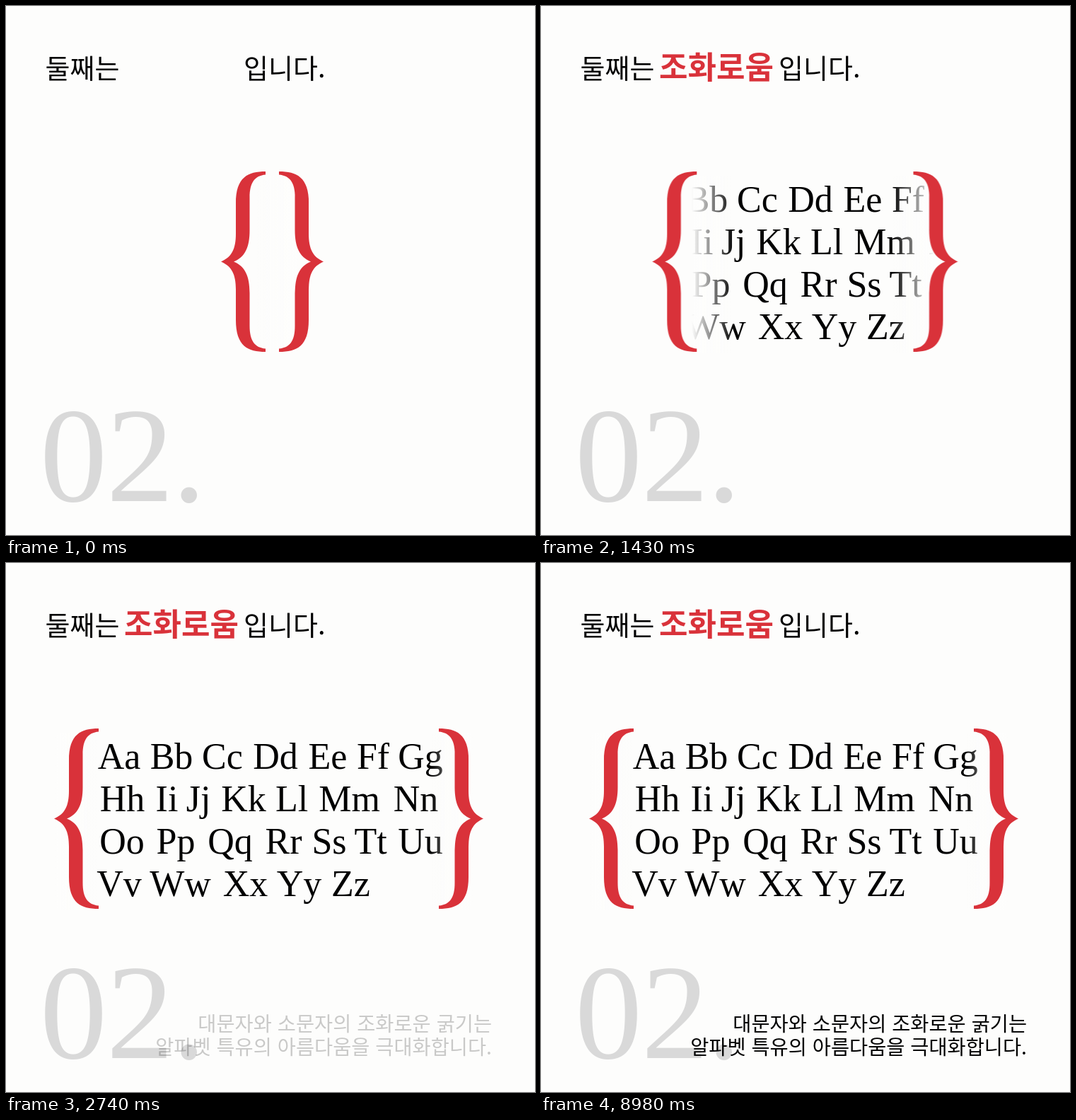
Write an HTML page that moves like this. It is 748 px wide and 748 px high and loops after 9.07 s.

```html
<!DOCTYPE html>
<html lang="ko">
<head>
<meta charset="utf-8">
<title>조화로움</title>
<style>
  html, body { margin: 0; width: 100%; height: 100%; overflow: hidden; background: #fdfdfc; }
  svg { display: block; width: 100%; height: 100%; }
  text { font-family: "Noto Sans CJK KR", "Noto Sans KR", "Noto Sans CJK", sans-serif; }
  .head { font-size: 38px; }
  .word { font-size: 44px; font-weight: 700; fill: #d9323a; }
  .caption { font-size: 28.4px; text-anchor: end; }
  .number { font: 190px "Liberation Serif", "Times New Roman", serif; fill: #d9d9d9; }
  .letters text { font: 52px "Liberation Serif", "Times New Roman", serif; text-anchor: middle; }
  .brace { fill: #d9323a; }

  .word, .caption, .letters, .cover, .brace { animation: 9.07s linear infinite both; }
  .word { animation-name: word; }
  .caption { animation-name: caption; }
  .letters { animation-name: letters; }
  .cover.left { animation-name: cover-left; }
  .cover.right { animation-name: cover-right; }
  .brace.left { animation-name: brace-left; }
  .brace.right { animation-name: brace-right; }

  @keyframes word {
    0%, .33% { opacity: 0; }
    6.95%, 100% { opacity: 1; }
  }
  @keyframes caption {
    0%, 30.19% { opacity: 0; }
    30.2% { opacity: .2; }
    34.95%, 100% { opacity: 1; }
  }
  @keyframes letters {
    0%, 7.82% { opacity: 0; }
    9.7%, 100% { opacity: 1; }
  }
  @keyframes cover-left {
    0%, 7.82% { transform: translateX(365px); }
    18.74% { transform: translateX(157px); }
    21.61%, 100% { transform: translateX(70px); }
  }
  @keyframes cover-right {
    0%, 7.82% { transform: translateX(413px); }
    18.74% { transform: translateX(609px); }
    21.61%, 100% { transform: translateX(660px); }
  }
  @keyframes brace-left {
    0%, 7.82% { transform: translateX(236px); }
    20.62%, 100% { transform: translateX(0); }
  }
  @keyframes brace-right {
    0%, 7.82% { transform: translateX(-226px); }
    20.62%, 100% { transform: translateX(0); }
  }
</style>
</head>
<body>
<svg viewBox="0 0 748 748">
  <defs>
    <linearGradient id="fade">
      <stop offset=".9" stop-color="#fdfdfc"/>
      <stop offset="1" stop-color="#fdfdfc" stop-opacity="0"/>
    </linearGradient>
    <!-- opaque up to x = 0, clear from x = 60 -->
    <rect id="cover" x="-540" y="240" width="600" height="250" fill="url(#fade)"/>
    <path id="brace" d="M63 0C38 0 21 8 21 45V88C21 110 15 121 0 127.5C15 134 21 145 21 167V210C21 247 38 255 63 255V250.5C48 249 40.5 240 40.5 218V172C40.5 148 34 134 18 127.5C34 121 40.5 107 40.5 83V37C40.5 15 48 6 63 4.5Z"/>
  </defs>

  <text class="head" x="55.5" y="102.3">둘째는</text>
  <text class="word" x="167" y="102.5">조화로움</text>
  <text class="head" x="336" y="102.3">입니다.</text>

  <g class="letters" id="letters"></g>
  <g class="cover left"><use href="#cover"/></g>
  <g class="cover right"><use href="#cover" transform="scale(-1 1)"/></g>

  <g class="brace left"><use href="#brace" transform="translate(68 234)"/></g>
  <g class="brace right"><use href="#brace" transform="translate(675 234) scale(-1 1)"/></g>

  <text class="number" x="48 142 235" y="700.3">02.</text>

  <g class="caption">
    <text x="687" y="661.5">대문자와 소문자의 조화로운 굵기는</text>
    <text x="687" y="695">알파벳 특유의 아름다움을 극대화합니다.</text>
  </g>
</svg>
<script>
  // horizontal centres of the letter pairs, row by row
  const rows = [
    [160, 234, 306, 381, 455, 519, 586],
    [164.5, 227.5, 272, 336, 404, 485.5, 579.5],
    [164, 240, 317, 392.5, 457, 515.5, 586],
    [160, 246.5, 338.5, 414.5, 487.5]
  ];
  const group = document.getElementById('letters');
  let code = 65;
  rows.forEach((centres, row) => centres.forEach(x => {
    const pair = document.createElementNS('http://www.w3.org/2000/svg', 'text');
    const capital = String.fromCharCode(code++);
    pair.textContent = capital + capital.toLowerCase();
    pair.setAttribute('x', x);
    pair.setAttribute('y', 291 + row * 60);
    group.append(pair);
  }));
</script>
</body>
</html>
```
